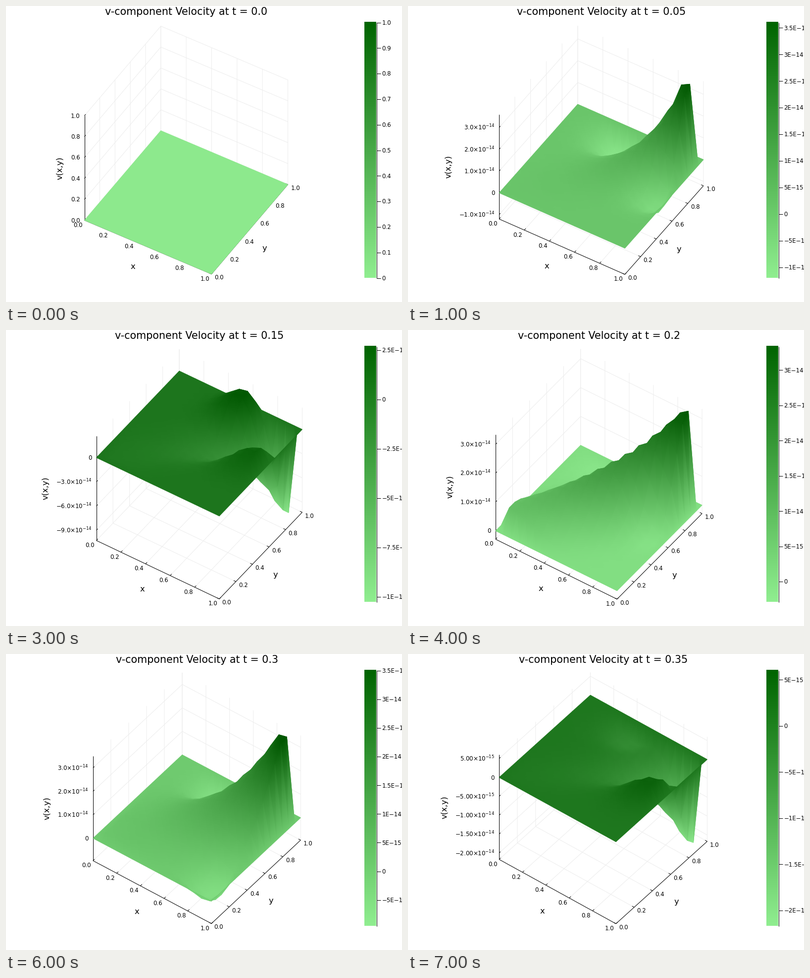
Write a matplotlib script that moves like this. It is 800x600 px and loops after 8 s.

```python
import math

import numpy as np
import matplotlib.pyplot as plt
from matplotlib.animation import FuncAnimation
from matplotlib.colors import LinearSegmentedColormap
from matplotlib.tri import Triangulation

W, H, DPI = 800, 600, 100
N = 15                           # cells per side of the surface
RX, RY, RZ = 299.5, 211.8, 212   # projected axis lengths
CY = 291.6                       # vertical centre of the box
LIGHT, DARK = np.array([144, 238, 144]) / 255, np.array([0, 100, 0]) / 255

plt.rcParams["font.family"] = "DejaVu Sans"
plt.rcParams["mathtext.fontset"] = "dejavusans"

bar_map = LinearSegmentedColormap.from_list("bar", [LIGHT, DARK])
surf_map = LinearSegmentedColormap.from_list("surf", [LIGHT * 0.98, DARK * 0.87])

# (low, high, ridge decay, ridge width, front lobe, back lobe, back strength)
STEPS = [
    (0, 1, 0, 1, 0, 0, 0),
    (-1.2, 3.6, 0.38, 4, 5, -7.5, 1),
    (-1.42, 4.79, 0.38, 4, 5, -7.5, 1),
    (-10.27, 2.69, 0.3, 3.2, 5.4, -4.9, 1),
    (-0.29, 3.336, 0.12, 4, 5.3, -10, 0.7),
    (-0.5, 3.4, 0.2, 5, 8, -9, 0.9),
    (-0.954, 3.502, 0.25, 6.5, 11, -7.4, 1),
    (-2.17, 0.6, 0.33, 3.3, 6.2, -7.2, -0.7),
]


def pick_step(span, choices, most):
    return next(s for s in choices if span / s <= most)


def ticks(lo, hi, step):
    first = math.ceil(lo / step - 1e-6)
    last = math.floor(hi / step + 1e-6)
    return [i * step for i in range(first, last + 1)]


def split(v):
    """Mantissa and exponent of v * 1e-14."""
    e = math.floor(math.log10(abs(v)) + 1e-9)
    return v / 10 ** e, e - 14


def z_text(v, dec):
    if abs(v) < 1e-9:
        return "0"
    m, e = split(v)
    return rf"${m:.{dec}f}{{\times}}10^{{{e}}}$"


def bar_text(v):
    if abs(v) < 1e-9:
        return "0"
    m, e = split(v)
    return f"{m:g}E{e}".replace("-", "\u2212")


def field(lo, hi, decay, width, front, back, back_gain):
    """Ridge along the diagonal with a lobe on each side, zero on the border."""
    peak, other = (hi, lo) if hi > -lo else (lo, hi)
    a, b = np.meshgrid(N - np.arange(N + 1), N - np.arange(N + 1), indexing="ij")
    s, w = (a + b) / 2, b - a
    v = peak * np.exp(-decay * np.maximum(s - 1.5, 0) - (w / width) ** 2)
    for w0, gain in ((front, 0.7), (back, back_gain)):
        s0 = 1.5 + abs(w0) / 2
        near = abs(gain) * np.exp(-((s - s0) / 2.2) ** 2 - ((w - w0) / 3) ** 2)
        v = v + near * (math.copysign(other, other * gain) - v)
    v[[0, -1], :] = 0
    v[:, [0, -1]] = 0
    return np.clip(v, lo, hi)


def cells():
    """Triangles from the far corner to the near one."""
    out = []
    for i in range(N):
        for j in range(N - 1, -1, -1):
            p = i * (N + 1) + j
            q = p + N + 1
            out += [(p, p + 1, q), (p + 1, q + 1, q)]
    return np.array(out)


CELLS = cells()
FIFTHS = [i / 5 for i in range(6)]

fig = plt.figure(figsize=(W / DPI, H / DPI), dpi=DPI, facecolor="white")
ax = fig.add_axes([0, 0, 1, 1])


def put(x, y, s, px=11.8, ha="center", **kw):
    kw.setdefault("va", "baseline")
    ax.text(x, y, s, fontsize=px * 72 / DPI, ha=ha, color="black", **kw)


def line(points, color="black", z=2):
    xs, ys = zip(*points)
    ax.plot(xs, ys, color=color, lw=72 / DPI, zorder=z, solid_capstyle="butt")


def draw_bar(lo, hi, plain):
    top, bottom = 33, 551
    ax.imshow(np.linspace(1, 0, 256)[:, None], cmap=bar_map, vmin=0, vmax=1,
              extent=(723.5, 747.5, bottom, top - 0.5), aspect="auto",
              interpolation="nearest")
    line([(748, top), (748, bottom)])
    for v in ticks(lo, hi, pick_step(hi - lo, (0.1, 0.5, 1, 2.5), 10)):
        y = bottom - (v - lo) / (hi - lo) * (bottom - top)
        line([(748, y), (756, y)])
        label = (f"{v:.1f}" if v else "0") if plain else bar_text(v)
        put(759, y + 4.3, label, ha="left")


def draw(k):
    lo, hi = STEPS[k][:2]
    plain = k == 0
    z_step = pick_step(hi - lo, (0.2, 0.5, 1, 3), 6.3)
    z_ticks = [((v - lo) / (hi - lo), v) for v in ticks(lo, hi, z_step)]
    dec = 2 if z_step < 1 and not plain else 1

    # wider tick labels push the box to the right
    label_w = 18 if plain else 61 + 10 * (z_ticks[0][1] < 0) + 7.5 * (dec - 1)
    cx = 354.5 + label_w / 2
    ang = math.radians(31 + k)
    c, s = math.cos(ang), math.sin(ang)

    def proj(x, y, z):
        px = cx + RX * (c * (x - 0.5) + s * (y - 0.5))
        py = CY + RY * (s * (x - 0.5) - c * (y - 0.5)) - RZ * (z - 0.5)
        return px, py

    ax.clear()
    ax.axis("off")

    # grid on the floor and the two back walls
    grey = "#ededed"
    for t in FIFTHS:
        line([proj(t, 0, 0), proj(t, 1, 0), proj(t, 1, 1)], grey, 1)
        line([proj(1, t, 0), proj(0, t, 0), proj(0, t, 1)], grey, 1)
    for f, _ in z_ticks:
        line([proj(0, 0, f), proj(0, 1, f), proj(1, 1, f)], grey, 1)

    # axes, ticks and tick labels
    line([proj(0, 0, 1), proj(0, 0, 0)])
    line([proj(0, 0, 0), proj(1, 0, 0), proj(1, 1, 0)])
    for t in FIFTHS:
        x, y = proj(t, 0, 0)
        line([(x, y), proj(t, 0.018, 0)])
        put(x - 13, y + 13.3, f"{t:.1f}")
        x, y = proj(1, t, 0)
        line([(x, y), proj(1 - 0.018, t, 0)])
        put(x + 15, y + 11, f"{t:.1f}")
    for f, v in z_ticks:
        x, y = proj(0, 0, f)
        line([(x, y), proj(0, 0.016, f)])
        text = f"{v:.1f}" if plain else z_text(v, dec)
        put(x - 9, y + (5.5 if "$" in text else 4.3), text, ha="right")

    # surface
    v = np.zeros((N + 1, N + 1)) if plain else field(*STEPS[k])
    z = (v - lo) / (hi - lo)
    u = np.linspace(0, 1, N + 1)
    gx, gy = np.meshgrid(u, u, indexing="ij")
    px, py = proj(gx, gy, z)
    tri = Triangulation(px.ravel(), py.ravel(), CELLS)
    ax.tripcolor(tri, z.ravel(), shading="gouraud", cmap=surf_map,
                 vmin=0, vmax=1, zorder=3)

    # titles
    put(cx, 18, f"v-component Velocity at t = {round(k * 0.05, 2)}", 20.6)
    x, y = proj(0.5, 0, 0)
    put(x - 31, y + 44, "x", 16.2)
    x, y = proj(1, 0.5, 0)
    put(x + 30, y + 43.5, "y", 16.2)
    put(472 - cx - 0.7 * k, proj(0, 0, 0.5)[1], "v(x,y)", 16.2,
        va="center", rotation=90)

    draw_bar(lo, hi, plain)
    # whole numbers fall on pixel centres
    ax.set_xlim(-0.5, W - 0.5)
    ax.set_ylim(H - 0.5, -0.5)
    return []


anim = FuncAnimation(fig, draw, frames=len(STEPS), init_func=lambda: draw(0),
                     interval=1000, repeat=True, repeat_delay=0, blit=False)
plt.show()
```
